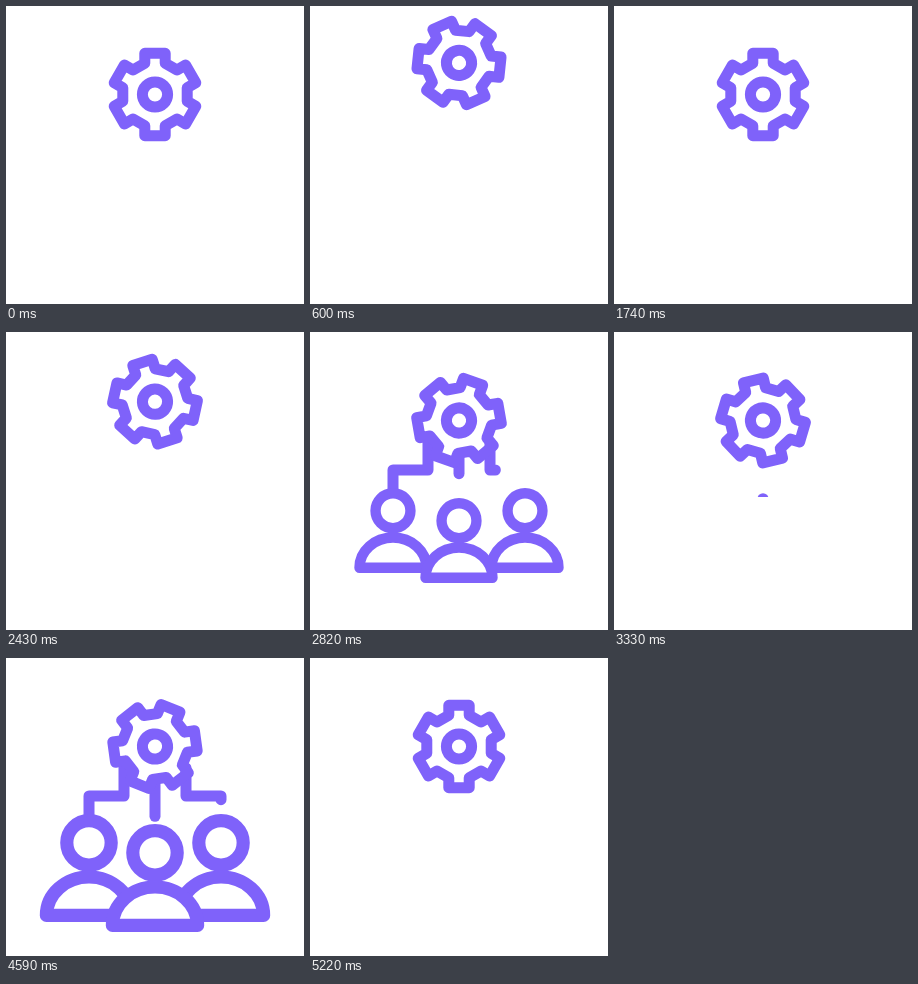
An HTML page with a canvas for the animation above (5400 ms loop, 298 by 298 pixels).

```html
<!DOCTYPE html>
<html>
<head>
<meta charset="utf-8">
<style>
html, body { margin: 0; width: 100%; height: 100%; overflow: hidden; background: #fff; }
canvas { display: block; width: 298px; height: 298px; }
</style>
</head>
<body>
<canvas></canvas>
<script>
const LOOP = 5400, CYCLE = 1740, STEP = 30;
const SIZE = 298, CX = 149, REST = 88.5, LIFT = 36, SPREAD = 66;
const TAU = Math.PI * 2;
const dpr = window.devicePixelRatio || 1;
const canvas = document.querySelector('canvas');
canvas.width = canvas.height = SIZE * dpr;
const c = canvas.getContext('2d');

// Progress 0..1 of t through a span.
const part = (t, from, length) => Math.min(1, Math.max(0, (t - from) / length));
const wave = u => (1 - Math.cos(Math.PI * u)) / 2;
const backOut = (u, k = 2.6) => 1 + (k + 1) * (u - 1) ** 3 + k * (u - 1) ** 2;

function drawGear(y, angle) {
  c.save();
  c.translate(CX, y);
  c.rotate(angle);
  c.beginPath();
  for (let i = 0; i < 6; i++) {
    c.lineTo(-10.2, -31.3);
    c.lineTo(-10.2, -41.2);
    c.lineTo(10.2, -41.2);
    c.lineTo(10.2, -31.3);
    c.rotate(TAU / 6);
  }
  c.closePath();
  c.moveTo(12.6, 0);
  c.arc(0, 0, 12.6, 0, TAU);
  c.stroke();
  c.restore();
}

// side: -1 left, 0 centre, 1 right
function drawLine(side, t) {
  const to = part(t, side < 0 ? 960 : 1050, 90);
  const from = part(t, side ? 1440 : 1500, 108);
  if (to <= from) return;
  const inner = CX + 31 * side, outer = CX + SPREAD * side;
  const top = side ? 110 : 125, bend = 138, bottom = 175;
  const length = bottom - top + Math.abs(outer - inner);
  c.save();
  c.beginPath();
  c.rect(0, 0, SIZE, side ? 168 : 165);
  c.clip();
  c.beginPath();
  c.moveTo(inner, top);
  c.lineTo(inner, bend);
  c.lineTo(outer, bend);
  c.lineTo(outer, bottom);
  c.setLineDash([length * (to - from), 999]);
  c.lineDashOffset = -length * from;
  c.stroke();
  c.restore();
}

function drawPerson(side, scale) {
  c.save();
  c.translate(CX + SPREAD * side, side ? 156 : 166);
  c.scale(scale, scale);
  c.beginPath();
  c.ellipse(0, 84.5, 35.5, 32, 0, Math.PI, TAU);
  c.closePath();
  c.fill();
  c.stroke();
  c.beginPath();
  c.arc(0, 24, 18.5, 0, TAU);
  c.fill();
  c.stroke();
  c.restore();
}

function render(now) {
  const time = Math.floor(now % LOOP / STEP) * STEP;
  const t = time >= 3 * CYCLE ? 0 : time % CYCLE;
  c.setTransform(dpr, 0, 0, dpr, 0, 0);
  c.fillStyle = '#fff';
  c.fillRect(0, 0, SIZE, SIZE);
  c.strokeStyle = '#7f62fa';
  c.lineWidth = 11;
  c.lineCap = c.lineJoin = 'round';

  const scale = backOut(part(t, 1050, 120)) * (1 - wave(part(t, 1410, 110)));
  for (const side of [-1, 1, 0]) drawLine(side, t);
  if (scale > 0) for (const side of [-1, 1, 0]) drawPerson(side, scale);

  // The gear hops once and makes a third of a turn at a slightly uneven speed.
  const hop = wave(part(t, 0, 520)) - wave(part(t, 520, 350));
  const u = t / CYCLE;
  const degrees = 120 * u - 1.5 * Math.sin(TAU * u) + 4.5 * Math.sin(2 * TAU * u);
  drawGear(REST - LIFT * hop, degrees * TAU / 360);
}

let start;
function tick(now) {
  start ??= now;
  render(now - start);
  requestAnimationFrame(tick);
}
render(0);
requestAnimationFrame(tick);
</script>
</body>
</html>
```
